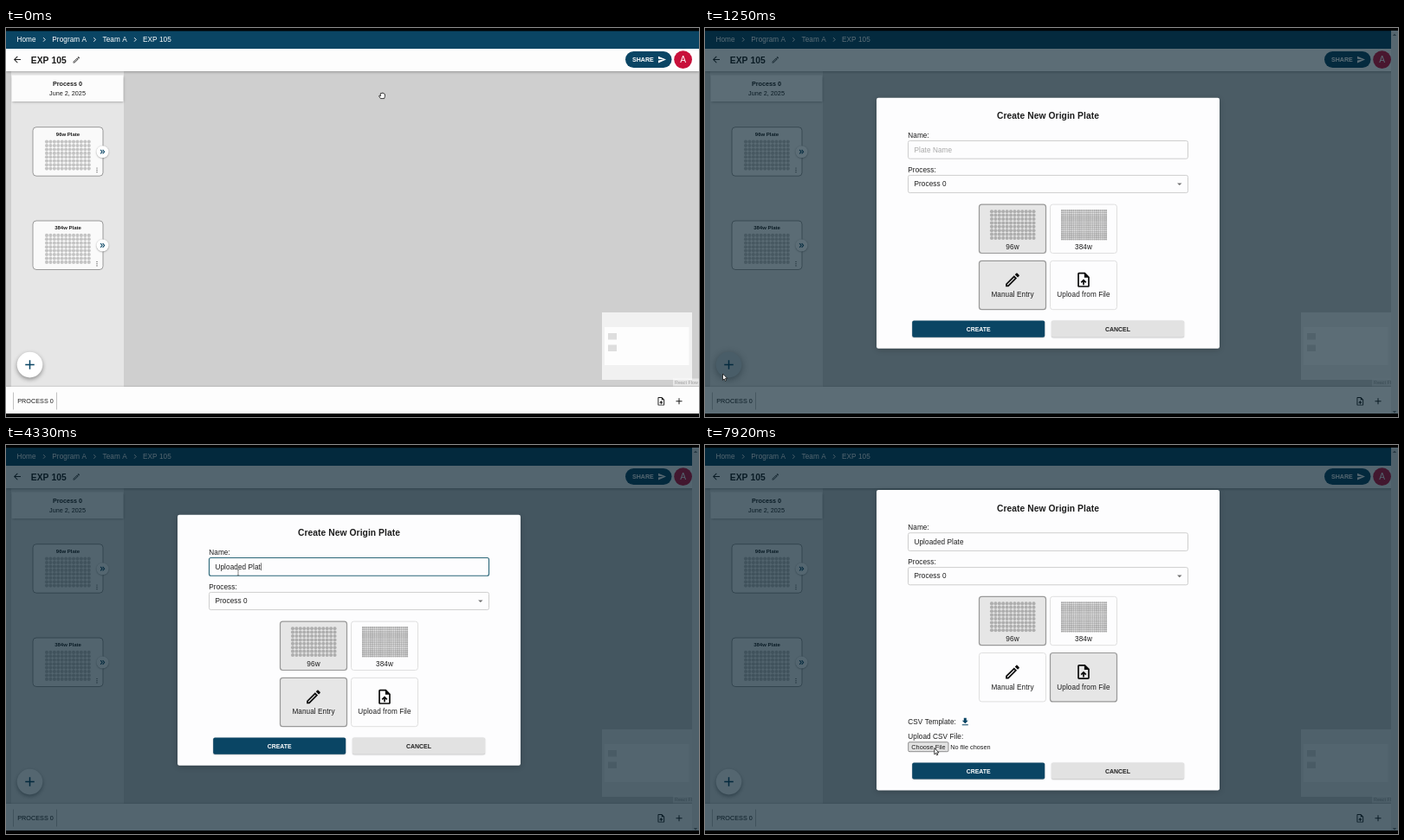
Recreate the animation shown at these times as an HTML page with a canvas. Size 800 by 450 pixels, loop 8000 ms.

```html
<!DOCTYPE html>
<html lang="en">
<head>
<meta charset="utf-8">
<title>Create plate</title>
<style>
html, body { margin: 0; width: 100%; height: 100%; overflow: hidden; background: #000; }
canvas { display: block; width: 800px; height: 450px; }
</style>
</head>
<body>
<canvas id="stage" width="800" height="450"></canvas>
<script>
const ctx = document.getElementById('stage').getContext('2d');
const LOOP = 8000, STEP = 1000 / 12;
const NAVY = '#0a4564', INK = '#1c1c1c';
const OPEN = 1160, FOCUS = 2410, EXPAND = 5300;
const NAME = 'Uploaded Plate';
// moment at which each letter of the name is typed
const KEYS = [2700, 2820, 2900, 2960, 3030, 3100, 3160, 3220, 3270, 3320, 3740, 3960, 4220, 4400];
// pointer stops: time, x, y
const STOPS = [[150, 434, 78], [1000, 20.5, 400], [1420, 20.5, 400], [2300, 268, 147.5],
  [4500, 268, 147.5], [5200, 398, 296.5], [6340, 398, 296.5], [7350, 264.8, 350.5]];

const ICON = {
  back: 'M20 11H7.83l5.59-5.59L12 4l-8 8 8 8 1.41-1.41L7.83 13H20v-2z',
  edit: 'M14.06 9.02l.92.92L5.92 19H5v-.92l9.06-9.06M17.66 3c-.25 0-.51.1-.7.29l-1.83 1.83 3.75 3.75 1.83-1.83c.39-.39.39-1.02 0-1.41l-2.34-2.34c-.2-.2-.45-.29-.71-.29zm-3.6 3.19L3 17.25V21h3.75L17.81 9.94l-3.75-3.75z',
  send: 'M2.01 21L23 12 2.01 3 2 10l15 2-15 2z',
  upload: 'M14 2H6c-1.1 0-1.99.9-1.99 2L4 20c0 1.1.89 2 1.99 2H18c1.1 0 2-.9 2-2V8l-6-6zm4 18H6V4h7v5h5v11zM8 15.01l1.41 1.41L11 14.84V19h2v-4.16l1.59 1.59L16 15.01 12.01 11 8 15.01z',
  download: 'M5 20h14v-2H5v2zM19 9h-4V3H9v6H5l7 7 7-7z',
  plus: 'M19 13h-6v6h-2v-6H5v-2h6V5h2v6h6v2z'
};
const POINTER = {
  arrow: 'M0 0V7.4L1.7 5.9 2.8 8.3 4 7.8 2.9 5.4H5.2Z',
  hand: 'M-.8 .8C-.8-.2 .6-.2 .6 .8V3.4L3.6 4.1C4.4 4.3 4.5 4.8 4.3 5.6L3.6 8.8H-.6L-2.9 5.6C-3.2 4.8-2.2 4.4-1.6 5L-.8 5.7Z',
  grab: 'M-1.6 3.6L-3.3 1C-3.6 .1-2.6-.2-2.1 .5L-1.7 1V-2C-1.6-2.9-.7-2.9-.5-2.1-.3-3.4 .8-3.3 .9-2.2 1.3-3 2.1-2.7 2.2-1.8 2.8-2.2 3.4-1.8 3.4-1.1V1.3L2.6 3.6Z'
};
for (const set of [ICON, POINTER]) for (const k in set) set[k] = new Path2D(set[k]);

function rect(x, y, w, h, fill) {
  ctx.fillStyle = fill;
  ctx.fillRect(x, y, w, h);
}

function box(x, y, w, h, r, fill, line, width = 1) {
  ctx.beginPath();
  ctx.roundRect(x, y, w, h, r);
  if (fill) { ctx.fillStyle = fill; ctx.fill(); }
  if (line) { ctx.strokeStyle = line; ctx.lineWidth = width; ctx.stroke(); }
}

function disc(x, y, r, fill) {
  ctx.beginPath();
  ctx.arc(x, y, r, 0, 7);
  ctx.fillStyle = fill;
  ctx.fill();
}

function shadowed(blur, dy, color, draw) {
  ctx.save();
  ctx.shadowBlur = blur;
  ctx.shadowOffsetY = dy;
  ctx.shadowColor = color;
  draw();
  ctx.restore();
}

function text(str, x, y, { size = 8.2, color = INK, bold = false, align = 'left', gap = .077 } = {}) {
  ctx.font = `${bold ? 'bold ' : ''}${size}px "Liberation Sans", Arial, sans-serif`;
  ctx.letterSpacing = gap + 'px';
  ctx.textAlign = align;
  ctx.fillStyle = color;
  ctx.fillText(str, x, y);
}

function icon(name, cx, cy, size, color) {
  ctx.save();
  ctx.translate(cx - size / 2, cy - size / 2);
  ctx.scale(size / 24, size / 24);
  ctx.fillStyle = color;
  ctx.fill(ICON[name], 'evenodd');
  ctx.restore();
}

function line(points, color, width) {
  ctx.beginPath();
  points.forEach(([x, y]) => ctx.lineTo(x, y));
  ctx.strokeStyle = color;
  ctx.lineWidth = width;
  ctx.stroke();
}

function chevron(x, y, w, h, color, width) {
  line([[x, y - h], [x + w, y], [x, y + h]], color, width);
}

function triangle(x, y, w, h, color) {
  ctx.beginPath();
  ctx.moveTo(x - w, y);
  ctx.lineTo(x + w, y);
  ctx.lineTo(x, y + h);
  ctx.fillStyle = color;
  ctx.fill();
}

function wells(x, y, cols, rows, pitch, r, color) {
  for (let i = 0; i < cols * rows; i++)
    disc(x + (i % cols) * pitch, y + Math.floor(i / cols) * pitch, r, color);
}

function plateCard(y, label) {
  box(31, y, 81, 56.5, 4, '#fafafa', '#999');
  text(label, 71.5, y + 10.2, { size: 6, bold: true, align: 'center', gap: 0 });
  wells(47, y + 16.9, 12, 8, 4.43, 2.05, '#c4c4c4');
  for (let i = 0; i < 3; i++) disc(105, y + 47.4 + i * 2.3, .65, '#555');
  shadowed(2, .5, 'rgba(0,0,0,.4)', () => disc(111.5, y + 28.5, 7, '#fff'));
  chevron(109.1, y + 28.5, 2, 2.3, NAVY, 1.1);
  chevron(111.6, y + 28.5, 2, 2.3, NAVY, 1.1);
}

function header() {
  rect(0, 3.5, 800, 20.5, NAVY);
  const white = { color: '#fff' };
  text('Home', 12.5, 16.2, white);
  text('Program A', 53.3, 16.2, white);
  text('Team A', 111.5, 16.2, white);
  text('EXP 105', 158, 16.2, white);
  for (const x of [43, 101.2, 148]) chevron(x, 13.4, 2.3, 2.3, '#fff', .9);

  shadowed(3, 1, 'rgba(0,0,0,.3)', () => rect(0, 24, 800, 26, '#fdfdfd'));
  rect(0, 23, 800, 1, NAVY);
  icon('back', 13, 36.6, 12, INK);
  text('EXP 105', 28.7, 40.6, { size: 10.3, bold: true });
  icon('edit', 81.3, 36.8, 10, '#444');
  box(715, 27, 53.5, 19, 9.5, NAVY);
  text('SHARE', 723, 39.1, { size: 7.1, bold: true, color: '#fff', gap: 0 });
  icon('send', 757.3, 36.6, 10.3, '#fff');
  disc(781.6, 36.6, 10.4, '#c8103a');
  text('A', 781.6, 40.2, { size: 10.2, color: '#fff', align: 'center', gap: 0 });
}

function page(t) {
  rect(0, 0, 800, 450, '#000');
  rect(0, 50, 800, 365, '#cfcfcf');
  rect(6, 50, 130, 365, '#e6e6e6');
  shadowed(3, 1, 'rgba(0,0,0,.35)', () => rect(6.5, 54.5, 129, 30.5, '#fcfcfc'));
  text('Process 0', 71, 67.2, { size: 7.2, bold: true, align: 'center', gap: 0 });
  text('June 2, 2025', 71, 77.8, { size: 7.2, align: 'center', gap: .02 });
  plateCard(114.7, '96w Plate');
  plateCard(223, '384w Plate');

  const pressed = t > 1060 && t < 1300;
  shadowed(pressed ? 8 : 5, 2, 'rgba(0,0,0,.4)', () => disc(27.5, 389.6, 14.8, pressed ? '#c9d2d7' : '#fff'));
  icon('plus', 27.5, 389.6, 18, NAVY);

  rect(688, 329, 104, 78, '#f1f1f1');
  rect(691, 346, 97.5, 44, '#fdfdfd');
  for (const y of [353, 366.5]) rect(695, y, 10, 7.5, '#dedede');
  rect(770, 405.5, 30, 9, 'rgba(255,255,255,.5)');
  text('React Flow', 772, 411.5, { size: 5.3, color: '#999', gap: .05 });

  header();

  shadowed(2, -.5, 'rgba(0,0,0,.3)', () => rect(0, 415, 800, 31, '#fdfdfd'));
  rect(0, 446, 800, 4, '#000');
  for (const x of [8.5, 58.5]) line([[x, 421.5], [x, 441.5]], '#c2c2c2', 1);
  text('PROCESS 0', 13.2, 434.3, { size: 7.2, gap: .06 });
  icon('upload', 756.3, 431.8, 11.5, INK);
  icon('plus', 777, 431.8, 12, INK);
}

function backdrop(t) {
  rect(792, 3.5, 8, 442.5, '#ededed');
  triangle(796, 9, 2.2, -2.6, '#777');
  triangle(796, 443, 2.2, 2.6, '#777');
  const alpha = t < 1240 ? .04 : t < 1320 ? .635 : .67;
  rect(0, 3.5, 800, 442.5, `rgba(0,28,42,${alpha})`);
}

function tile(x, y, label, selected) {
  box(x, y, 77, 56.4, 3, selected ? '#e6e6e6' : '#fdfdfe', selected ? '#989898' : '#dfdfdf', selected ? 1.2 : 1);
  text(label, x + 38.5, y + (y < 250 ? 51.4 : 42), { align: 'center' });
}

function button(x, label, fill, color, y) {
  shadowed(1.5, .5, 'rgba(0,0,0,.3)', () => box(x, y, 153, 19.2, 2, fill));
  text(label, x + 76.5, y + 12.1, { size: 6.95, bold: true, color, align: 'center', gap: 0 });
}

function nameField(t) {
  const focused = t >= FOCUS && t < EXPAND;
  const typed = NAME.slice(0, KEYS.filter(k => k <= t).length);
  box(234.5, 130.5, 323, 20.7, 2, '#fdfdfe', focused ? '#2a6678' : '#cecece', focused ? 1.1 : 1);
  if (typed) text(typed, 241.5, 143.6);
  else text('Plate Name', 241.5, 143.6, { color: '#a8a8a8' });
  if (focused) {
    const w = typed ? ctx.measureText(typed).width : 0;
    rect(241.6 + w, 136.4, .6, 8.8, INK);
  }
}

function modal(t) {
  const wide = t >= EXPAND, shift = wide ? 28.8 : 0;
  shadowed(6, 1.5, 'rgba(0,0,0,.22)', () =>
    box(198, 80.7 - shift, 396, 290 + 2 * shift, 2.2, '#fdfdfe'));

  ctx.save();
  ctx.translate(0, -shift);
  text('Create New Origin Plate', 396, 105.3, { size: 10.26, bold: true, align: 'center' });
  text('Name:', 234.3, 127.1);
  nameField(t);
  text('Process:', 234.3, 166.5);
  box(234.5, 170.4, 323, 20.2, 2, null, '#cecece');
  text('Process 0', 241.5, 183.2);
  triangle(547.8, 179.4, 2.7, 2.7, '#707070');

  tile(316.5, 204.1, '96w', true);
  wells(331, 212.2, 12, 8, 4.41, 2.05, '#aeaeae');
  tile(398.5, 204.1, '384w', false);
  wells(412, 211.1, 24, 16, 2.22, 1.14, '#a9a9a9');
  tile(316.5, 269.3, 'Manual Entry', !wide);
  icon('edit', 355, 291.3, 21, '#0c0c0c');
  tile(398.5, 269.3, 'Upload from File', wide);
  icon('upload', 437, 291.3, 20.5, '#0c0c0c');
  ctx.restore();

  if (wide) {
    text('CSV Template:', 234.3, 323.4);
    icon('download', 300.3, 320.2, 12, NAVY);
    text('Upload CSV File:', 234.3, 340);
    box(234.7, 343.7, 46.3, 11, 1.3, t > 7300 ? '#e2e2e2' : '#efefef', '#767676', .8);
    text('Choose File', 257.9, 351.8, { size: 7.3, align: 'center', gap: .03 });
    text('No file chosen', 283.3, 351.5, { size: 7.3, gap: 0 });
  }
  button(239.2, 'CREATE', NAVY, '#fff', 338.6 + shift);
  button(400, 'CANCEL', '#e2e2e2', '#222', 338.6 + shift);
}

function pointerAt(t) {
  const i = STOPS.findIndex(s => s[0] > t);
  if (i === 0) return STOPS[0].slice(1);
  if (i < 0) return STOPS[STOPS.length - 1].slice(1);
  const [t0, x0, y0] = STOPS[i - 1], [t1, x1, y1] = STOPS[i];
  const p = (t - t0) / (t1 - t0), e = p * p * (3 - 2 * p);
  return [x0 + (x1 - x0) * e, y0 + (y1 - y0) * e];
}

function pointer(t) {
  const [x, y] = pointerAt(t);
  const inside = (l, top, r, b) => x >= l && x <= r && y >= top && y <= b;
  let kind = 'arrow';
  if (t < OPEN) kind = y < 370 ? 'grab' : 'arrow';
  else if (t < EXPAND && inside(234, 130, 558, 152)) kind = 'text';
  else if (inside(316, 204, 477, 326)) kind = 'hand';

  ctx.save();
  ctx.translate(x, y);
  if (kind === 'text') {
    line([[0, -3.2], [0, 3.2]], '#555', .7);
    for (const d of [-3.2, 3.2]) line([[-1.2, d], [1.2, d]], '#555', .6);
  } else {
    ctx.fillStyle = '#fff';
    ctx.strokeStyle = '#111';
    ctx.lineWidth = .8;
    ctx.lineJoin = 'round';
    ctx.fill(POINTER[kind]);
    ctx.stroke(POINTER[kind]);
  }
  ctx.restore();
}

function draw(t) {
  page(t);
  if (t >= OPEN) {
    backdrop(t);
    modal(t);
  }
  pointer(t);
}

const start = performance.now();
function tick() {
  const now = (performance.now() - start) % LOOP;
  draw(Math.floor((now + 4) / STEP) * STEP);
  requestAnimationFrame(tick);
}
tick();
</script>
</body>
</html>
```
